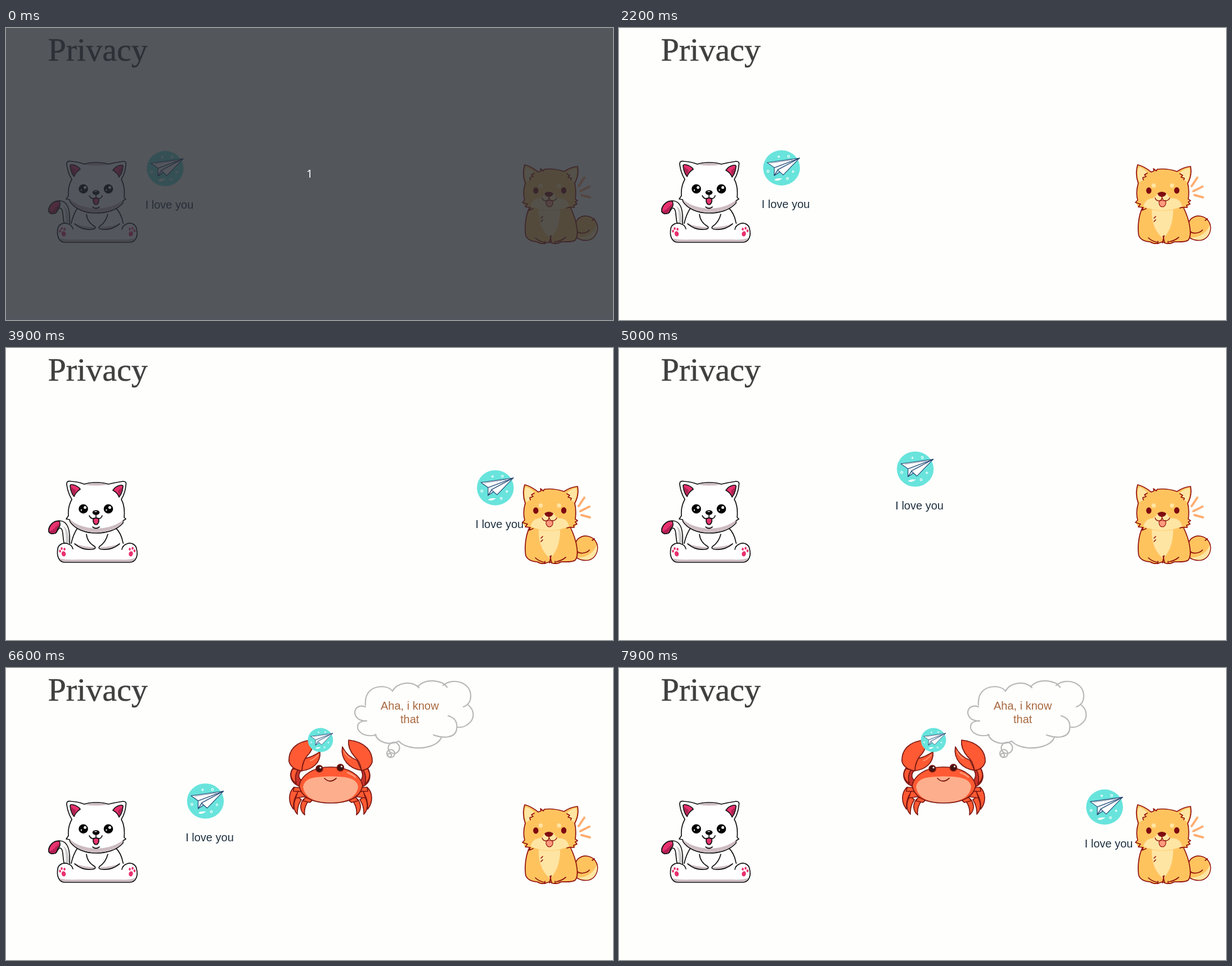
These frames come from a looping animation (1079 px wide and 519 px high, 8 s). An HTML page:

```html
<!DOCTYPE html>
<html lang="en">
<head>
<meta charset="utf-8">
<title>Privacy</title>
<style>
html, body { margin: 0; width: 100%; height: 100%; overflow: hidden; background: #fefefd; }
svg { display: block; width: 100%; height: 100%; }
text { font-family: "Liberation Sans", Arial, sans-serif; font-size: 20px; }
#cat, #dog, #crab { stroke-width: 1.7; stroke-linejoin: round; stroke-linecap: round; }
#cat { stroke: #111; fill: #fff; }
#dog { stroke: #8f0f0c; fill: #ffc35e; }
#crab { stroke: #7a1712; fill: #ff5a33; }
#cat .n, #dog .n, #crab .n { stroke: none; }
#cat .l, #dog .l, #crab .l { fill: none; }
</style>
</head>
<body>
<svg viewBox="0 0 1079 519">
  <defs>
    <g id="icon">
      <ellipse rx="32.7" ry="31.3" fill="#68e4dc"/>
      <g fill="none" stroke="#fff" stroke-width="1.2">
        <path d="M-7.500-20h5M-5-22.500v5M18 6.500h5M20.500 4v5"/>
        <circle cx="12.500" cy="-20.500" r="1.800"/>
        <circle cx="-24" cy="6" r="1.800"/>
        <circle cx="10.500" cy="19" r="1.800"/>
      </g>
      <path d="M-13 21.500q3-3 7-3h7q-2 2-4 2.500q-2 2-6 1.500z" fill="#fff"/>
      <g fill="#fff" stroke="#1c4270" stroke-width="1.1" stroke-linejoin="round">
        <path d="M-13-.500L-13 13.500L-6 3L32-17.500z" fill="#eaf4fa"/>
        <path d="M-13 13.500L-2 6.500L-6 3z" fill="#cfe6f2"/>
        <path d="M-25.500-9.500L32-17.500L-13-.500z"/>
        <path d="M32-17.500L3 12.500L-7 3.500z"/>
        <path d="M-19-8.500L20-14.500" fill="none" stroke-width=".5"/>
      </g>
    </g>
  </defs>

  <text x="74.500" y="58.300" fill="#404040" stroke="#404040" stroke-width=".5" style="font:58px 'Liberation Serif',Times,serif">Privacy</text>

  <g id="mover">
    <use href="#icon" x="283" y="249.800"/>
    <text x="247.700" y="321.300" fill="#1f3140">I love you</text>
  </g>

  <g id="cat">
    <!-- tail -->
    <path d="M113 349C114 330 113 307 94 307C84 307 75 317 76 326Q79 332 88 329C92 326 92 320 96 320C103 321 100 339 104 349z"/>
    <path class="n" d="M106 347C107 333 106 321 101 316Q112 321 112 346z" fill="#c9c9c9"/>
    <path d="M95 308C84 306 75 317 76 326Q79 332 88 329C92 326 90 320 95 318Q97 313 95 308z" fill="#e8316f"/>
    <path class="n" d="M94 312Q85 324 77 326Q80 331 87 328C91 325 89 320 94 317z" fill="#b51f55"/>
    <!-- body -->
    <path d="M127 320C121 329 118 338 116 347L114 360H211L208 346C206 335 202 326 194 319z"/>
    <path class="n" d="M103 381C93 379 90 368 92 357C93 348 104 346 112 349L127 345H198L213 349C221 344 231 348 232 357C235 368 232 381 219 381z"/>
    <path class="n" d="M95 374Q108 377 125 376H203Q220 377 230 373Q227 380 219 380H104Q98 380 95 374z" fill="#cdbcc2"/>
    <path class="l" d="M119 357Q117 350 110 348C102 345 93 349 92 357C90 368 93 381 105 381H219C232 381 235 368 232 357C231 349 222 345 215 348Q207 351 206 358"/>
    <path class="n" d="M131 331Q130 341 145 347Q158 353 160 356Q150 361 133 355L118 346zM192 331Q194 341 179 347Q166 353 164 356Q174 361 191 355L206 346z"/>
    <path class="n" d="M121 347Q138 354 157 354Q158 357 151 357Q132 357 121 347zM203 347Q187 354 168 354Q165 357 172 357Q192 357 203 347z" fill="#cdbcc2"/>
    <path class="l" d="M143 331C144 343 151 349 158 353Q161 357 152 358C140 359 129 354 122 348M181 331C178 343 172 349 166 353Q163 357 171 358C184 359 195 354 202 348"/>
    <g class="n" fill="#e8316f">
      <ellipse cx="102.500" cy="365.800" rx="3.700" ry="4.700" transform="rotate(-15 102.500 365.800)"/>
      <ellipse cx="96" cy="361" rx="1.800" ry="2.500"/>
      <ellipse cx="99" cy="356.500" rx="1.800" ry="2.400"/>
      <ellipse cx="104" cy="357.500" rx="1.800" ry="2.600"/>
      <ellipse cx="222" cy="365.800" rx="3.700" ry="4.700" transform="rotate(15 222 365.800)"/>
      <ellipse cx="220" cy="357.500" rx="1.800" ry="2.600"/>
      <ellipse cx="225" cy="356" rx="1.800" ry="2.400"/>
      <ellipse cx="228.500" cy="360.500" rx="1.800" ry="2.500"/>
    </g>
    <!-- head -->
    <path d="M117 269Q110 258 108 243Q107 235 116 237Q130 238 139 242C151 238 170 238 182 242Q195 239 208 237Q215 237 213 244Q212 258 205 269C211 280 211 291 210 301L213 304L208 307L208 311C197 324 178 329 160 329C141 329 123 322 114 309L113 305L107 304L111 298C110 287 112 278 117 269z"/>
    <path class="n" d="M114 305Q130 319 160 321Q190 320 208 306L207 311C196 323 178 328 160 328C141 328 124 321 115 309z" fill="#cdbcc2"/>
    <path class="n" d="M140 243C152 239 169 239 181 243Q160 246 140 243z" fill="#cdbcc2"/>
    <path d="M114 245Q114 242 119 243Q128 245 132 251Q124 256 121 264Q115 257 114 245z" fill="#e8316f"/>
    <path d="M208 246Q208 243 203 244Q194 246 190 253Q198 257 201 265Q207 258 208 246z" fill="#e8316f"/>
    <path class="n" d="M115 246L124 253L121 262Q116 256 115 246zM207 247L199 254L201 263Q206 257 207 247z" fill="#ae2454"/>
    <g class="n" fill="#000">
      <circle cx="137.500" cy="286" r="8.300"/><circle cx="182" cy="286" r="8.300"/>
      <ellipse cx="160" cy="292.500" rx="6.300" ry="4.200"/>
    </g>
    <g class="n">
      <circle cx="140.500" cy="283.500" r="2.500"/><circle cx="134" cy="288" r="1.200"/>
      <circle cx="184.500" cy="283.500" r="2.500"/><circle cx="178.500" cy="288" r="1.200"/>
      <ellipse cx="159.500" cy="290.800" rx="2.500" ry=".8"/>
    </g>
    <path d="M155 303Q160 301 165 303Q166 313 160 314Q154 313 155 303z" fill="#e8316f"/>
    <path class="l" d="M148 298Q152 306 160 302Q168 306 171 298M160 296V302M154 318Q160 323 166 318"/>
  </g>

  <g id="dog">
    <!-- tail -->
    <path d="M1013 372Q1024 379 1036 377C1050 373 1054 357 1050 347C1044 333 1026 330 1016 340C1009 349 1011 360 1016 365z"/>
    <path class="n" d="M1016 372C1032 373 1045 364 1050 350C1053 359 1048 373 1036 376Q1023 378 1016 372z" fill="#ffe5a3"/>
    <path class="l" d="M1012 356Q1016 367 1028 364Q1034 363 1037 359M1042 342L1046 339"/>
    <!-- body -->
    <path d="M931 318C922 336 922 360 924 369Q928 379 944 380Q950 384 958 383L966 380L973 383Q981 384 987 380Q1007 381 1012 377C1018 370 1017 347 1003 318z"/>
    <path class="n" d="M947 318C946 346 953 362 967 374C979 363 986 344 985 318z" fill="#ffe5a3"/>
    <path class="l" d="M969 369L966 382M967 370L970 382M941 373Q947 379 957 381M995 372Q988 378 978 380M951 338L954 335M951 344L954 341M958 379V383M976 379V383"/>
    <!-- head -->
    <path class="n" d="M922 243Q934 246 946 256L957 251Q974 249 992 255Q1004 247 1016 246Q1019 262 1011 276Q1014 288 1012 304L1015 313L1010 319L998 320Q966 330 935 320L923 318L918 310L922 306C919 295 920 286 923 276Q917 259 922 243z"/>
    <path class="n" d="M932 317Q936 304 946 303Q954 302 957 294Q966 289 974 294Q977 303 987 303Q998 304 1001 317Q966 332 932 317z" fill="#ffe5a3"/>
    <path class="l" d="M937 321L930 324L932 319L923 318L927 313L918 310L922 306C919 295 920 286 923 276Q917 259 922 243Q934 246 946 256L951 254L950 250L955 254L957 251Q974 249 992 255Q1004 247 1016 246Q1019 262 1011 276Q1014 288 1012 304L1016 307L1012 309L1015 313L1009 315L1010 319Q1003 318 997 320"/>
    <path class="n" d="M924 247Q933 249 939 257L935 259L937 263L931 265L932 270L925 274Q919 260 924 247z" fill="#ffe5a3"/>
    <path class="n" d="M1014 249Q1004 250 997 258L1002 261L1000 265L1005 266L1004 270L1010 274Q1016 261 1014 249z" fill="#ffe5a3"/>
    <path class="l" d="M939 258L934 261L937 264L931 266L932 270M997 259L1002 262L999 265L1005 267L1004 270"/>
    <circle class="n" cx="950.500" cy="280" r="3.700" fill="#ffe5a3"/>
    <circle class="n" cx="983" cy="280" r="3.700" fill="#ffe5a3"/>
    <g class="n" fill="#7d0a10">
      <ellipse cx="941.800" cy="289" rx="4.700" ry="5.700"/>
      <ellipse cx="991.500" cy="288.800" rx="4.700" ry="5.700"/>
      <path d="M957 294Q965 288 973 294Q971 300 965 300Q959 300 957 294z"/>
    </g>
    <path d="M960 308Q966 305 972 308Q973 317 966 318Q959 317 960 308z" fill="#ff9a7c" stroke-width="1.200"/>
    <path class="l" d="M953 302Q955 308 961 307Q966 306 965 299Q966 307 971 307Q977 307 979 302" stroke-width="1.400"/>
    <path class="l" d="M1018 281L1028 266M1021 290L1037 282M1023 297L1038 301" style="stroke:#ffad6f;stroke-width:4"/>
  </g>

  <g id="extra">
    <g id="crab">
      <g id="legs">
        <path d="M512 212C502 221 501 238 511 251Q510 233 519 221z"/>
        <path d="M530 213L512 212L511 219L529 220z"/>
        <path d="M517 228C510 239 510 252 518 260Q517 246 525 234z"/>
        <path d="M540 222L519 219L515 231L537 228z"/>
        <path d="M529 233C521 243 523 255 531 261Q529 249 537 237z"/>
        <path d="M546 234L532 230L528 236L540 239z"/>
      </g>
      <use href="#legs" transform="translate(1154 0) scale(-1 1)"/>
      <!-- arms -->
      <path d="M510 178C502 190 506 204 521 210L526 200Q516 194 525 181z" fill="#c8322a"/>
      <path d="M510 179C503 189 507 199 516 205Q512 192 519 181z"/>
      <path d="M630 179Q638 193 629 201L634 211C648 204 650 191 643 178z" fill="#c8322a"/>
      <path d="M643 179C649 190 646 199 638 206Q642 193 635 181z"/>
      <!-- claws -->
      <path d="M524 183C546 181 560 167 558 149Q545 158 531 161z"/>
      <path d="M545 128C514 130 502 147 503 166Q507 180 526 183Q526 165 539 152Q548 140 545 128z"/>
      <path d="M632 182C610 179 594 162 598 140Q606 157 624 164z"/>
      <path d="M609 128C639 131 652 149 651 167Q647 180 632 182Q629 165 620 158Q607 143 609 128z"/>
      <path class="l" d="M555 154Q549 162 541 165M601 148Q605 157 612 161" style="stroke:#ff9c7a"/>
      <!-- shell -->
      <path d="M521 209C525 190 546 176 577 176C609 176 630 190 634 209C630 231 607 240 577 240C547 240 525 231 521 209z"/>
      <path class="n" d="M528 211Q531 196 553 194Q577 191 602 194Q624 197 626 211C623 231 604 239 577 239C549 239 531 231 528 211z" fill="#fdae8c"/>
      <path class="l" d="M607 186Q616 189 621 194" style="stroke:#ff9c7a;stroke-width:2.500"/>
      <path class="l" d="M566 196Q576 206 587 196"/>
      <circle cx="557" cy="179" r="6" fill="#421310"/>
      <circle cx="594.500" cy="177.200" r="6" fill="#421310"/>
      <circle class="n" cx="559" cy="177" r="1.600" fill="#fff"/>
      <circle class="n" cx="596.500" cy="175" r="1.600" fill="#fff"/>
    </g>
    <use href="#icon" transform="translate(559 128) scale(.685)"/>
    <g fill="none" stroke="#b8b8b8" stroke-width="2.200" stroke-linecap="round">
      <path d="M639 66C637 42 652 33 669 33Q682 34 687 41C696 25 722 22 734 35M733 32C745 19 774 20 784 34M777 31C794 16 828 25 826 52Q825 65 813 69M822 66C834 76 833 92 821 100Q812 107 802 105M786 85Q804 90 801 109C799 124 778 126 760 119M774 123C768 139 743 143 727 142Q707 140 698 130C681 138 662 133 656 118M658 119C636 124 621 112 626 100Q629 94 642 94Q623 95 620 80C620 68 631 66 639 69"/>
      <circle cx="689.500" cy="142" r="10"/>
      <circle cx="684" cy="152" r="7"/>
      <circle cx="681.800" cy="155" r="3.300"/>
    </g>
    <g fill="#a8683f" text-anchor="middle">
      <text x="717.700" y="74">Aha, i know</text>
      <text x="717.700" y="98">that</text>
    </g>
  </g>

  <g id="intro">
    <rect width="1079" height="519" fill="#282c34" fill-opacity=".8"/>
    <text x="539.700" y="266" fill="#fff" text-anchor="middle" style="font:20px 'Noto Sans',sans-serif">1</text>
  </g>
</svg>
<script>
const LOOP = 8000, STEP = 100, FLIGHT = 2000, SPAN = 594, RISE = 36;
const starts = [2057, 4105, 6117];
const [mover, extra, intro] = ["mover", "extra", "intro"].map(id => document.getElementById(id));

// cubic-bezier(.42, 0, .58, 1), solved by bisection
function easeInOut(x) {
  if (x <= 0) return 0;
  if (x >= 1) return 1;
  let lo = 0, hi = 1, s;
  for (let i = 0; i < 24; i++) {
    s = (lo + hi) / 2;
    const r = 1 - s;
    if (1.26 * s * r * r + 1.74 * s * s * r + s * s * s < x) lo = s; else hi = s;
  }
  return s * s * (3 - 2 * s);
}

function show(el, on) {
  el.style.display = on ? "" : "none";
}

function draw(time) {
  const t = Math.floor((time % LOOP) / STEP) * STEP;
  const begin = starts.filter(s => s <= t).pop() ?? t;
  const k = easeInOut((t - begin) / FLIGHT);
  const y = -RISE * Math.sin(Math.PI * k);
  mover.setAttribute("transform", `translate(${SPAN * k} ${y})`);
  show(extra, t >= 6400);
  show(intro, t < STEP);
}

function tick() {
  draw(performance.now());
  requestAnimationFrame(tick);
}
tick();
</script>
</body>
</html>
```
